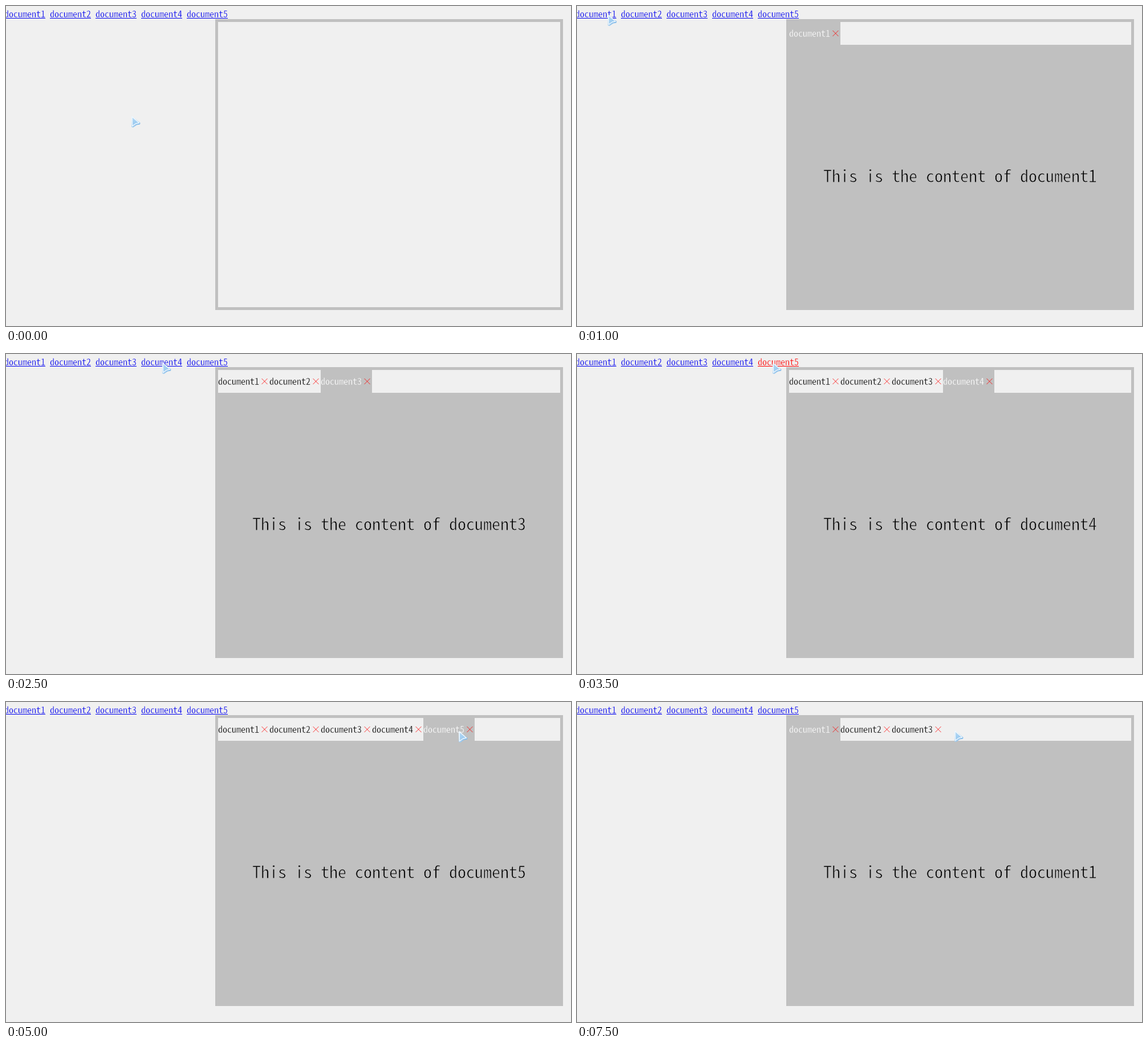
Recreate the animation shown at these times as an HTML page. Size 991 by 561 pixels, loop 8 s.

```html
<!DOCTYPE html>
<html lang="en">
<head>
<meta charset="utf-8">
<title>Document tabs</title>
<style>
  html, body { margin: 0; width: 100%; height: 100%; overflow: hidden; background: #f0f0f0; }
  svg { display: block; width: 991px; height: 561px; }
  /* A stroke in the background colour thins the letters. */
  text {
    font-family: "Noto Sans Mono CJK SC", "Noto Sans Mono CJK JP", "Liberation Mono", monospace;
    white-space: pre; stroke: #f0f0f0; stroke-width: 0.35;
  }
  #content { stroke: #c0c0c0; stroke-width: 0.9; }
  .link { fill: #0000ee; }
  .link.pressed { fill: #ff0000; }
  .tab rect { fill: #f0f0f0; }
  .tab.active rect { fill: #c0c0c0; }
  .tab.active text { fill: #ffffff; stroke: #c0c0c0; }
  .tab path { stroke: #ff0000; stroke-width: 0.8; }
</style>
</head>
<body>
<svg viewBox="0 0 991 561">
  <defs>
    <linearGradient id="rim" x1="0" y1="0.2" x2="0.7" y2="0.8">
      <stop offset="0" stop-color="#dcecf8"/>
      <stop offset="1" stop-color="#83bbe9"/>
    </linearGradient>
    <linearGradient id="ice" x1="0" y1="0" x2="0.6" y2="1">
      <stop offset="0" stop-color="#b9dbf4"/>
      <stop offset="1" stop-color="#93c6ef"/>
    </linearGradient>
  </defs>
  <rect width="991" height="561" fill="#f0f0f0"/>
  <rect x="369.5" y="25.5" width="605" height="505" fill="none" stroke="#c0c0c0" stroke-width="5"/>
  <g id="panel">
    <rect x="372" y="68" width="600" height="460" fill="#c0c0c0"/>
    <text id="content" x="432" y="309"></text>
  </g>
  <g id="tabs"></g>
  <g id="links"></g>
  <g id="cursor" stroke-linejoin="round">
    <path d="M1 0.5 L16.5 13 L16 15.5 L10.5 16.5 L4 21 L1 20 Z" fill="url(#rim)"/>
    <path d="M2 2 L14.5 13 L9 14 L2.5 18.5 Z" fill="url(#ice)" stroke="#f2f9fe" stroke-width="1.4"/>
  </g>
</svg>
<script>
const STEP = 500, STEPS = 16, DOCS = 5;
const LINK = 72, TAB = 90;
const linkX = doc => 80 * doc - 83;
const tabX = doc => 372 + TAB * (doc - 1);

// Steps at which a link is held down, a document opens, the last tab closes.
const presses = [3, 7], opens = [2, 4, 5, 6, 8], closes = [13, 15];

// Places the cursor visits, by step; it moves evenly between them.
const overLink = (doc, part) => [linkX(doc) + LINK * part, 14];
const overCross = doc => [tabX(doc) + 79, 47];
const stops = {
  0: [219, 192],
  1: [59, 20],
  2: overLink(1, 0.78),
  4: overLink(3, 0.36),
  5: overLink(4, 0.5),
  7: overLink(5, 0.35),
  8: [447, 56],
  10: [793, 50],
  12: overCross(5),
  13: [668, 52],
  14: overCross(4),
  15: [661, 49]
};
const stopSteps = Object.keys(stops).map(Number);

function cursorAt(step) {
  const from = stopSteps.findLast(s => s <= step);
  const to = stopSteps.find(s => s >= step);
  const part = to > from ? (step - from) / (to - from) : 0;
  return stops[from].map((v, i) => Math.round(v + (stops[to][i] - v) * part));
}

function stateAt(step) {
  const count = list => list.filter(s => s <= step).length;
  const opened = count(opens), closed = count(closes);
  return {
    open: opened - closed,
    active: closed ? 1 : opened,
    pressed: presses.includes(step) ? opened + 1 : 0
  };
}

const byId = id => document.getElementById(id);
const panel = byId("panel"), content = byId("content"), cursor = byId("cursor");

function add(parent, tag, attrs, label = "") {
  const node = document.createElementNS("http://www.w3.org/2000/svg", tag);
  for (const key in attrs) node.setAttribute(key, attrs[key]);
  node.textContent = label;
  return parent.appendChild(node);
}

// Font size at which one monospaced character advances by the given pixels.
const pen = document.createElement("canvas").getContext("2d");
pen.font = "100px " + getComputedStyle(content).fontFamily;
const advance = pen.measureText("0").width / 100;
const sizeFor = px => px / advance;

content.setAttribute("font-size", sizeFor(15));
const small = sizeFor(8);
const links = [], tabs = [];

for (let doc = 1; doc <= DOCS; doc++) {
  const name = "document" + doc, lx = linkX(doc), tx = tabX(doc);

  const link = add(byId("links"), "g", { class: "link" });
  add(link, "text", { x: lx, y: 20, "font-size": small }, name);
  add(link, "rect", { x: lx, y: 21, width: LINK, height: 1 });
  links.push(link);

  const tab = add(byId("tabs"), "g", { class: "tab" });
  add(tab, "rect", { x: tx, y: 28, width: TAB, height: 40 });
  add(tab, "text", { x: tx, y: 54, "font-size": small }, name);
  add(tab, "path", { d: `M${tx + 76.5} 43 l10 10 m0 -10 l-10 10` });
  tabs.push(tab);
}

let shown = -1;

function show(step) {
  if (step === shown) return;
  shown = step;
  const { open, active, pressed } = stateAt(step);
  cursor.setAttribute("transform", `translate(${cursorAt(step)})`);
  panel.style.display = active ? "" : "none";
  content.textContent = "This is the content of document" + active;
  tabs.forEach((tab, i) => {
    tab.style.display = i < open ? "" : "none";
    tab.classList.toggle("active", i + 1 === active);
  });
  links.forEach((link, i) => link.classList.toggle("pressed", i + 1 === pressed));
}

const start = performance.now();

function tick() {
  const time = performance.now() - start;
  show(Math.floor(time / STEP) % STEPS);
  requestAnimationFrame(tick);
}
tick();
</script>
</body>
</html>
```
